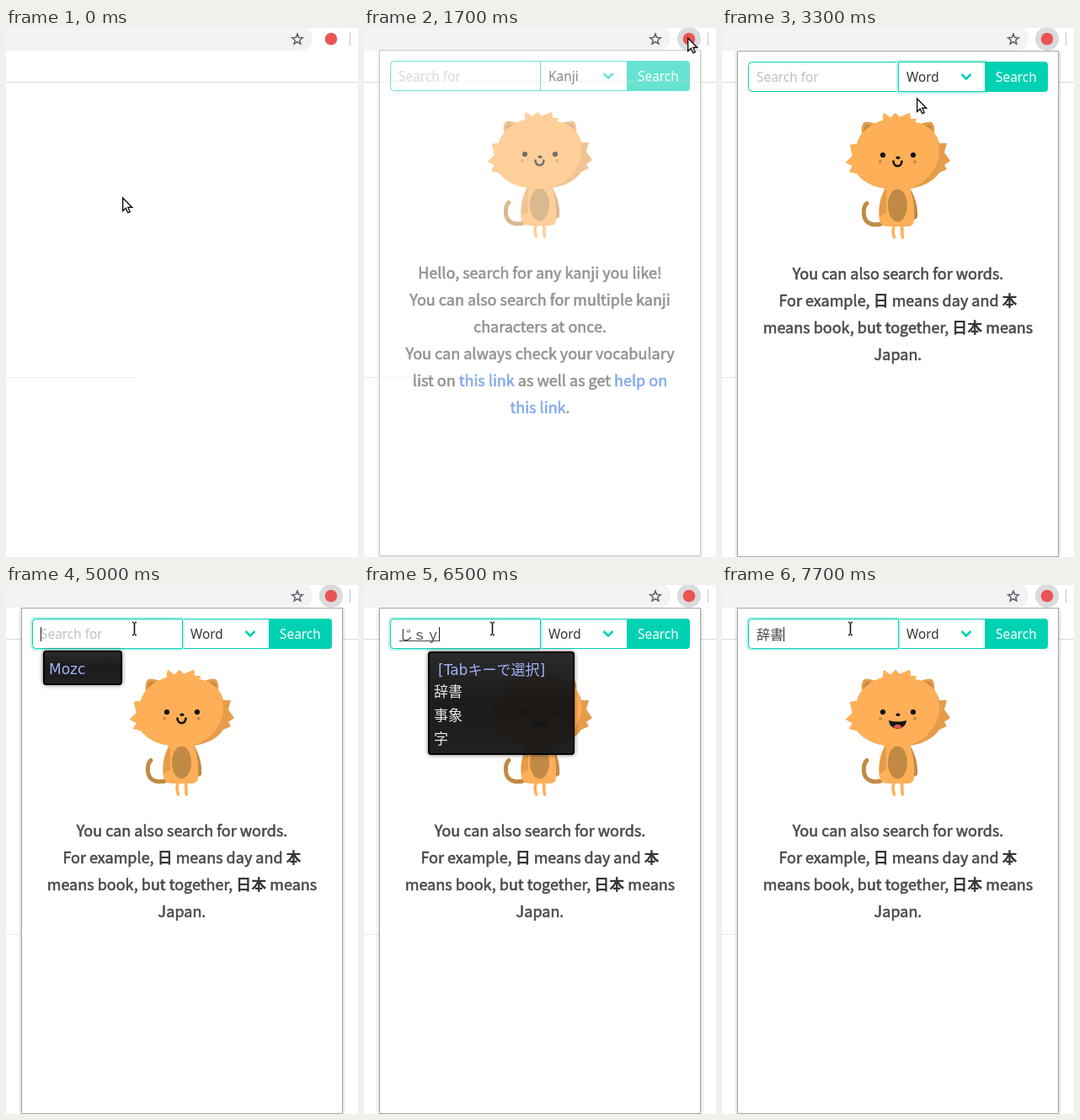
Write an HTML page with a canvas that moves like this. It is 418 px wide and 629 px high and loops after 8 s.

```html
<!DOCTYPE html>
<html lang="en">
<head>
<meta charset="utf-8">
<title>Kanji search popup</title>
<style>
html, body { margin: 0; width: 418px; height: 629px; overflow: hidden; background: #fff; }
canvas { display: block; }
</style>
</head>
<body>
<canvas id="stage" width="418" height="629"></canvas>
<script>
const ctx = document.getElementById('stage').getContext('2d');
const LOOP = 8000;
const UI = '15.4px "Noto Sans", "Noto Sans CJK JP", sans-serif';
const CJK = '"Noto Sans CJK JP", "Noto Sans CJK", sans-serif';
const IME = `17px "DejaVu Sans", ${CJK}`;
const TEAL = '#00d1b2', INK = '#363636', FUR = '#ffaf57', SHADE = '#e59c4b', BROWN = '#c08a45';

const INTRO = [
  'Hello, search for any kanji you like!',
  'You can also search for multiple kanji',
  'characters at once.',
  'You can always check your vocabulary',
  'list on _this link_ as well as get _help on_',
  '_this link_.'
];
const WORDS = [
  'You can also search for words.',
  'For example, *日* means day and *本*',
  'means book, but together, *日本* means',
  'Japan.'
];

// Input states: start time, text, underlined, candidate window.
const TAB = '[Tabキーで選択]';
const win = (x, w, ...rows) => ({ x, w, rows });
const TYPING = [
  [5600, 'ｊ', true, null],
  [5700, 'ｊ', true, win(45, 253, 'Javaプログラミング言語', 'JavaScript', 'JIS')],
  [5900, 'じ', true, win(61, 205, '自分で調べることが', '時間', '実は')],
  [6300, 'じｓ', true, win(61, 205, '自分で調べることが', '時間', '実は')],
  [6400, 'じｓ', true, win(77, 172, '実際', '自然', '辞書')],
  [6500, 'じｓｙ', true, win(77, 172, '辞書', '事象', '字')],
  [6600, 'じしょ', true, win(77, 172, '辞書', '事象', '字')],
  [6800, 'じしょ', true, win(77, 172, '辞書', '辞書を引く')],
  [7400, '辞書', true, win(77, 338, '辞書を引くことができます', '辞書')],
  [7500, '辞書', false, win(45, 333, '辞書を引くことができます', '辞書')],
  [7700, '辞書', false, null]
];

// Pointer moves: first step, number of steps, destination.
const MOVES = [
  [300, 8, 384, 11],
  [2000, 5, 260, 54],
  [2800, 3, 231, 105],
  [3300, 1, 231, 83],
  [3400, 3, 152, 52]
];

function pointerAt(t) {
  let x = 138, y = 201;
  for (const [start, steps, tx, ty] of MOVES) {
    if (t < start) break;
    const p = Math.min(1, (Math.floor((t - start) / 100) + 1) / steps);
    const e = p * p * (3 - 2 * p);
    x += (tx - x) * e;
    y += (ty - y) * e;
  }
  return { x: Math.round(x), y: Math.round(y) };
}

function rect(x, y, w, h, color) {
  ctx.fillStyle = color;
  ctx.fillRect(x, y, w, h);
}

function fillPath(d, color) {
  ctx.fillStyle = color;
  ctx.fill(new Path2D(d));
}

function strokePath(d, color, width) {
  ctx.strokeStyle = color;
  ctx.lineWidth = width;
  ctx.stroke(new Path2D(d));
}

function ellipse(x, y, rx, ry, color) {
  ctx.beginPath();
  ctx.ellipse(x, y, rx, ry, 0, 0, Math.PI * 2);
  ctx.fillStyle = color;
  ctx.fill();
}

function box(x, y, w, h, radii) {
  ctx.beginPath();
  ctx.roundRect(x, y, w, h, radii);
}

function label(text, x, y, color, font = UI) {
  ctx.font = font;
  ctx.fillStyle = color;
  ctx.fillText(text, x, y);
}

function drawPage(t) {
  rect(0, 0, 418, 629, '#fff');
  box(-20, -2, 384, 29, 14);
  ctx.fillStyle = '#f1f3f4';
  ctx.fill();
  rect(0, 64, 418, 1, '#d9d9d9');
  rect(0, 415, 152, 1, '#e8e8e8');
  rect(408, 5, 1, 16, '#c4c7ca');

  ctx.beginPath();
  for (let i = 0; i < 10; i++) {
    const r = i % 2 ? 2.9 : 6.6, a = -Math.PI / 2 + i * Math.PI / 5;
    ctx.lineTo(346 + r * Math.cos(a), 13.6 + r * Math.sin(a));
  }
  ctx.closePath();
  ctx.strokeStyle = '#5f6368';
  ctx.lineWidth = 1.5;
  ctx.stroke();

  if (t >= 1000) ellipse(386, 13, 14, 14, t < 1600 ? '#f1f1f2' : '#dadbdd');
  ellipse(386, 13, 7.3, 7.3, '#ea5455');
}

function drawCat(laughing) {
  ctx.lineCap = 'round';
  strokePath('M193 231 C184 236 170 235 168.500 222 C168 215 169 211 172 208.500', BROWN, 5);
  strokePath('M205 234 C202 240 203 244 204.500 249', FUR, 3.6);
  strokePath('M213 234 C215 240 213 244 214.500 249', FUR, 3.6);

  fillPath('M223 190 C230 202 233 214 232 226 L224 230 Z', BROWN);
  fillPath('M194 190 C187 203 185 216 187 229 Q189 236 197 236 H221 Q228 236 228 228 C229 212 227 202 223 190 Z', FUR);
  fillPath('M194 190 C188 202 186 212 187 224 L195 220 V194 Z', SHADE);
  ellipse(208.5, 211, 11.5, 19.5, BROWN);

  fillPath('M167 130 C165 122 165 116 169 112 C176 111 182 113 188 118 Z', SHADE);
  fillPath('M169 128 C168 121 169 117 171 115 C176 115 180 118 183 121 Z', BROWN);
  fillPath('M251 130 C253 122 253 116 249 112 C242 111 236 113 230 118 Z', SHADE);
  fillPath('M249 128 C250 121 249 117 247 115 C242 115 238 118 235 121 Z', BROWN);

  const head = 'M147 160 L155 152 L152 139 L160 138 C164 123 177 114 191 110 L192 101 L200 107 ' +
    'L206 101 L211 106 L223 101 L224 108 L231 108 L229 112 C246 115 255 125 258 137 L267 137 ' +
    'L264 148 L271 158 L264 163 L267 168 L258 172 C248 187 228 192 209 192 ' +
    'C188 192 170 186 160 173 L151 171 L155 164 Z';
  fillPath(head, SHADE);
  ctx.save();
  ctx.clip(new Path2D(head));
  ctx.fillStyle = FUR;
  ctx.fillRect(140, 95, 64, 100);
  ellipse(203, 146, 55, 48, FUR);
  ctx.restore();

  for (const side of [-1, 1]) {
    ellipse(209 + side * 18, 151, 3.1, 3.1, '#111');
    ellipse(208.5 + side * 20.5, 159, 2.1, 2.1, '#cc8c4b');
  }
  ellipse(209, 154.3, 2.7, 1.8, '#111');
  if (laughing) {
    fillPath('M198 161 Q208.500 164 219 161 C218 174 199 174 198 161 Z', '#151515');
    fillPath('M203 169 Q208.500 162 214 169 Q208.500 172 203 169 Z', '#e2574f');
  } else {
    strokePath('M203.500 158.500 C204 166 213 166 213.500 158.500', '#111', 2.6);
  }
  ctx.lineCap = 'butt';
}

function drawLine(line, y) {
  const parts = line.split(/(\*.*?\*|_.*?_)/).filter(Boolean).map(part => {
    const strong = part[0] === '*', link = part[0] === '_';
    const font = `${strong ? 'bold ' : ''}18px ${CJK}`;
    const text = strong || link ? part.slice(1, -1) : part;
    ctx.font = font;
    return { text, font, strong, width: ctx.measureText(text).width,
      color: link ? '#3273dc' : strong ? INK : '#4a4a4a' };
  });
  let x = 209 - parts.reduce((sum, p) => sum + p.width, 0) / 2;
  for (const p of parts) {
    label(p.text, x, y, p.color, p.font);
    if (!p.strong) {
      ctx.strokeStyle = p.color;
      ctx.lineWidth = 0.6;
      ctx.lineJoin = 'round';
      ctx.strokeText(p.text, x, y);
    }
    x += p.width;
  }
  ctx.lineJoin = 'miter';
}

function field(x, w, radii, focused) {
  if (focused) {
    box(x - 2, 38, w + 4, 40, radii ? 5 : 0);
    ctx.fillStyle = '#bff3ec';
    ctx.fill();
  }
  box(x + 0.5, 40.5, w - 1, 35, radii);
  ctx.fillStyle = '#fff';
  ctx.fill();
  ctx.strokeStyle = TEAL;
  ctx.lineWidth = 1;
  ctx.stroke();
}

function drawForm(t, state) {
  const inputFocus = t >= 3700, selectFocus = t >= 2500 && !inputFocus;
  if (selectFocus) {
    field(31, 179, [4, 0, 0, 4], false);
    field(209, 104, 0, true);
  } else {
    field(209, 104, 0, false);
    field(31, 179, [4, 0, 0, 4], inputFocus);
  }
  box(312, 40, 75, 36, [0, 4, 4, 0]);
  ctx.fillStyle = TEAL;
  ctx.fill();
  label('Search', 325, 63.5, '#fff');
  label(t < 3300 ? 'Kanji' : 'Word', 219, 63.5, INK);
  strokePath('M284.500 55 L290 60.500 L295.500 55', t >= 2400 && t < 3300 ? INK : TEAL, 2.6);

  let caret = 41;
  if (state) {
    const [, text, underlined] = state;
    const x = underlined ? 42 : 41;
    label(text, x, 64.5, '#4a4a4a', `16px ${CJK}`);
    caret = x + text.length * 16;
    if (underlined) rect(x, 66, text.length * 16 - 1, 1, '#4a4a4a');
  } else {
    label('Search for', 41, 63.5, '#c0c0c0');
  }
  if (inputFocus && !(t >= 4300 && t < 5000)) rect(Math.min(caret, 89), 50, 1, 17, '#222');
}

function drawPopup(t, state) {
  ctx.save();
  ctx.shadowColor = 'rgba(0,0,0,.3)';
  ctx.shadowBlur = 4;
  rect(18, 27, 382, 602, '#a8a8a8');
  ctx.restore();
  rect(19, 28, 380, 600, '#fff');
  drawCat(Boolean(state));
  (t < 3300 ? INTRO : WORDS).forEach((line, i) => drawLine(line, 299 + 32 * i));
  drawForm(t, state);
}

function drawOptions(active) {
  rect(209, 75, 104, 64, '#6c9be0');
  rect(210, 76, 102, 62, '#fff');
  rect(210, 77 + 20 * active, 102, 20, '#1e90ff');
  ['Kanji', 'Word', 'English'].forEach((name, i) =>
    label(name, 219, 92 + 20 * i, i === active ? '#fff' : INK));
}

function drawCandidates({ x, w, rows, title = TAB }) {
  const h = rows.length ? 37 + 28 * rows.length : 39;
  const y = rows.length ? 80 : 79;
  ctx.save();
  box(x - 1, y - 1, w + 2, h + 2, 4);
  ctx.shadowColor = 'rgba(0,0,0,.65)';
  ctx.shadowBlur = 5;
  const shade = ctx.createLinearGradient(0, y, 0, y + h);
  shade.addColorStop(0, 'rgba(36,36,36,.91)');
  shade.addColorStop(0.5, 'rgba(20,20,20,.91)');
  shade.addColorStop(1, 'rgba(25,25,25,.91)');
  ctx.fillStyle = shade;
  ctx.fill();
  ctx.restore();
  box(x, y, w, h, 3);
  ctx.strokeStyle = '#050505';
  ctx.lineWidth = 2;
  ctx.stroke();
  label(title, rows.length ? x + 11 : x + 6, rows.length ? 106.5 : 106, '#9fb2f7', IME);
  rows.forEach((row, i) => label(row, x + 6, 133 + 28 * i, '#e6e6e6', IME));
}

function drawPointer(t) {
  const { x, y } = pointerAt(t);
  ctx.save();
  ctx.translate(x, y);
  if (x < 209 && t >= 3300) {
    const beam = 'M-2 -7.500 H0 M1 -7.500 H3 M0.500 -7 V7 M-2 7.500 H0 M1 7.500 H3';
    strokePath(beam, '#fff', 3.4);
    strokePath(beam, '#111', 1.6);
  } else {
    const arrow = new Path2D('M0.700 0.900 V16.500 L4.300 13.200 L6.700 18.700 L9.200 17.600 L6.900 12.200 H11.700 Z');
    ctx.fillStyle = '#fff';
    ctx.fill(arrow);
    ctx.strokeStyle = '#111';
    ctx.lineWidth = 1.4;
    ctx.stroke(arrow);
  }
  ctx.restore();
}

function draw(t) {
  const state = TYPING.findLast(s => t >= s[0]);
  drawPage(t);
  if (t >= 1700) {
    const opening = t < 1800;
    ctx.save();
    if (opening) ctx.translate(0, -1);
    ctx.beginPath();
    ctx.rect(14, 27, 390, 603);
    ctx.clip();
    drawPopup(t, state);
    if (opening) {
      ctx.globalAlpha = 0.4;
      drawPage(t);
    }
    ctx.restore();
  }
  if (t >= 2500 && t < 3300) drawOptions(t < 2900 ? 0 : 1);
  if (t >= 5000 && t < 5600) drawCandidates({ x: 45, w: 92, rows: [], title: 'Mozc' });
  if (state && state[3]) drawCandidates(state[3]);
  drawPointer(t);
}

function tick() {
  draw(performance.now() % LOOP);
  requestAnimationFrame(tick);
}
tick();
</script>
</body>
</html>
```
